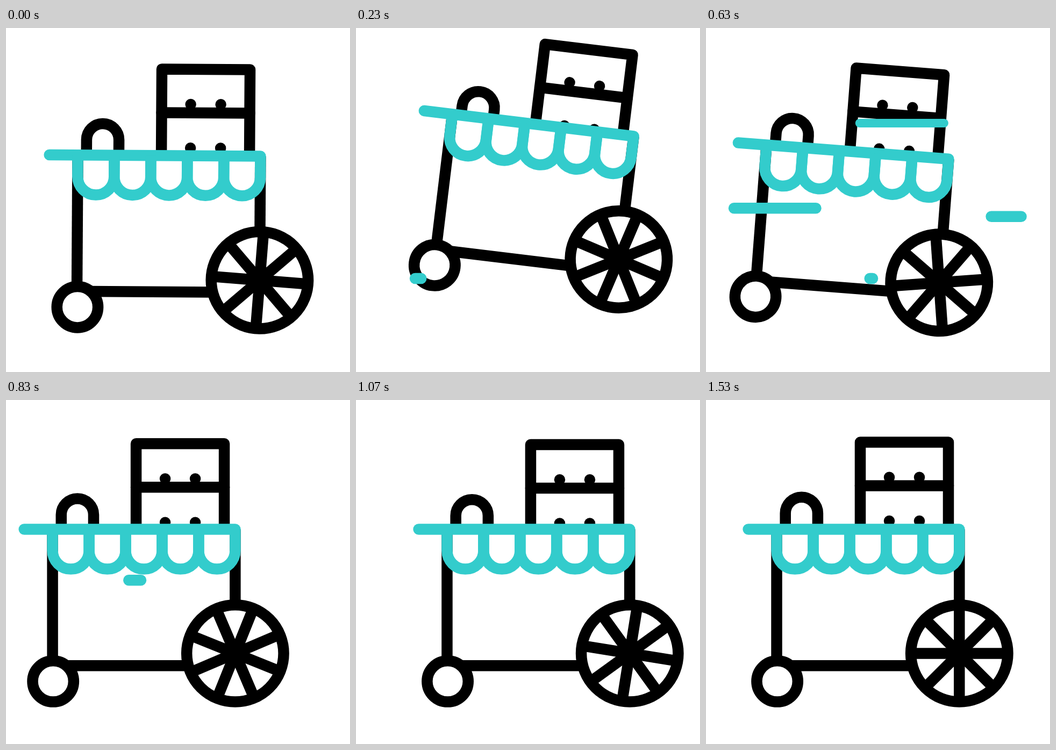
These frames come from a looping animation (640 px wide and 640 px high, 1.67 s). An HTML page with a canvas:

```html
<!DOCTYPE html>
<html lang="en">
<head>
<meta charset="utf-8">
<title>Street cart</title>
<style>
  html, body { margin: 0; width: 100%; height: 100%; overflow: hidden; background: #fff; }
  canvas { display: block; width: 100vmin; height: 100vmin; }
</style>
</head>
<body>
<canvas id="stage" width="640" height="640"></canvas>
<script>
const ctx = document.getElementById('stage').getContext('2d');
const LOOP = 1670;
const BLACK = '#000', TEAL = '#33cccc';
const STROKE = 20.5;
const PIVOT = { x: 444, y: 572 };
const LEFT = 131.5, RIGHT = 471.3, COUNTER = 240.6;

// Keyframes as [time, value], eased between neighbours.
const DRIVE = [[30, 0], [330, 7.5], [725, -54], [760, -54], [1146, 48], [1530, 0]];
const HOP = [[-33, 0], [217, -45.5], [435, 0]];
const TILT = [[-33, 0], [217, 7], [443, 0], [600, 4.7], [800, 0]];
const JOLT = [[-50, 0], [217, 12.1], [447, 0.3], [635, 6.7], [840, 2.8], [1060, 4.5], [1350, 0]];

const STREAKS = [
  { x: 110, y: 466, width: 20.5, length: 200, delay: 0 },
  { x: 386.5, y: 350.8, width: 20.5, length: 200, delay: 67 },
  { x: 243.5, y: 177, width: 16, length: 205, delay: 163 },
  { x: 51, y: 335.2, width: 20.5, length: 200, delay: 230 }
];

const clamp = v => Math.min(1, Math.max(0, v));
const smooth = v => { const s = clamp(v); return s * s * (3 - 2 * s); };

function track(keys, t) {
  let value = keys[0][1];
  for (let i = 1; i < keys.length; i++) {
    const [t0, v0] = keys[i - 1], [t1, v1] = keys[i];
    if (t >= t0) value = v0 + (v1 - v0) * smooth((t - t0) / (t1 - t0));
  }
  return value;
}

// Two turns on the curve cubic-bezier(.137, 0, .674, 1).
function spinAt(t) {
  const u = clamp((t + 33) / 1563);
  let lo = 0, hi = 1;
  for (let i = 0; i < 24; i++) {
    const s = (lo + hi) / 2, r = 1 - s;
    const x = 3 * r * r * s * 0.137 + 3 * r * s * s * 0.674 + s * s * s;
    if (x < u) lo = s; else hi = s;
  }
  return smooth(lo) * Math.PI * 4;
}

function line(...points) {
  ctx.beginPath();
  points.forEach(([x, y]) => ctx.lineTo(x, y));
  ctx.stroke();
}

function ring(x, y, r) {
  ctx.beginPath();
  ctx.arc(x, y, r, 0, Math.PI * 2);
  ctx.fillStyle = '#fff';
  ctx.fill();
  ctx.stroke();
}

function dot(x, y) {
  ctx.beginPath();
  ctx.arc(x, y, 10.25, 0, Math.PI * 2);
  ctx.fillStyle = BLACK;
  ctx.fill();
}

function drawGoods(drop) {
  ctx.save();
  ctx.translate(0, drop);
  ctx.lineCap = 'butt';
  line([287, 236], [287, 78.5], [451, 78.5], [451, 236]);
  ctx.beginPath();
  ctx.moveTo(147.7, 236);
  ctx.arc(177.8, 210.8, 30.1, Math.PI, 0);
  ctx.lineTo(207.9, 236);
  ctx.stroke();
  ctx.lineCap = 'round';
  line([287, 159.5], [451, 159.5]);
  for (const y of [143.7, 225]) {
    dot(341, y);
    dot(397, y);
  }
  ctx.restore();
}

function drawFrame() {
  ctx.lineCap = 'butt';
  line([LEFT, COUNTER], [LEFT, 482]);
  line([RIGHT, COUNTER], [RIGHT, 380]);
  line([155, 494.2], [385, 494.2]);
}

function drawAwning() {
  const step = (RIGHT - LEFT) / 5, r = step / 2, bend = 280.6;
  ctx.strokeStyle = TEAL;
  ctx.lineCap = 'round';
  line([78.6, COUNTER], [RIGHT, COUNTER]);
  ctx.lineCap = 'butt';
  for (let i = 0; i < 5; i++) {
    const x = LEFT + i * step;
    ctx.beginPath();
    ctx.moveTo(x, COUNTER);
    ctx.arc(x + r, bend, r, Math.PI, 0, true);
    ctx.lineTo(x + step, COUNTER);
    ctx.stroke();
  }
  ctx.strokeStyle = BLACK;
}

function drawWheels(spin) {
  ring(132.6, 523.4, 38.2);
  ring(RIGHT, 471.4, 90.2);
  ctx.save();
  ctx.translate(RIGHT, 471.4);
  ctx.rotate(spin);
  for (let i = 0; i < 4; i++) {
    line([-88, 0], [88, 0]);
    ctx.rotate(Math.PI / 4);
  }
  ctx.restore();
}

function drawStreaks(t) {
  ctx.strokeStyle = TEAL;
  ctx.lineCap = 'round';
  for (const { x, y, width, length, delay } of STREAKS) {
    const head = smooth((t - delay - 186) / 313);
    const tail = smooth((t - delay - 390) / 267);
    if (head <= tail) continue;
    ctx.lineWidth = width;
    line([x + tail * length, y], [x + head * length, y]);
  }
}

function draw(t) {
  const tilt = track(TILT, t) * Math.PI / 180;
  ctx.fillStyle = '#fff';
  ctx.fillRect(0, 0, 640, 640);
  ctx.strokeStyle = BLACK;
  ctx.lineWidth = STROKE;
  ctx.lineJoin = 'round';

  ctx.save();
  ctx.translate(PIVOT.x + track(DRIVE, t), PIVOT.y + track(HOP, t));
  ctx.rotate(tilt);
  ctx.translate(-PIVOT.x, -PIVOT.y);
  drawGoods(track(JOLT, t));
  drawFrame();
  drawAwning();
  // The wheel turns independently of the cart's tilt.
  drawWheels(spinAt(t) - tilt);
  ctx.restore();

  drawStreaks(t);
}

const start = performance.now();
function tick() {
  draw((performance.now() - start) % LOOP);
  requestAnimationFrame(tick);
}
tick();
</script>
</body>
</html>
```
